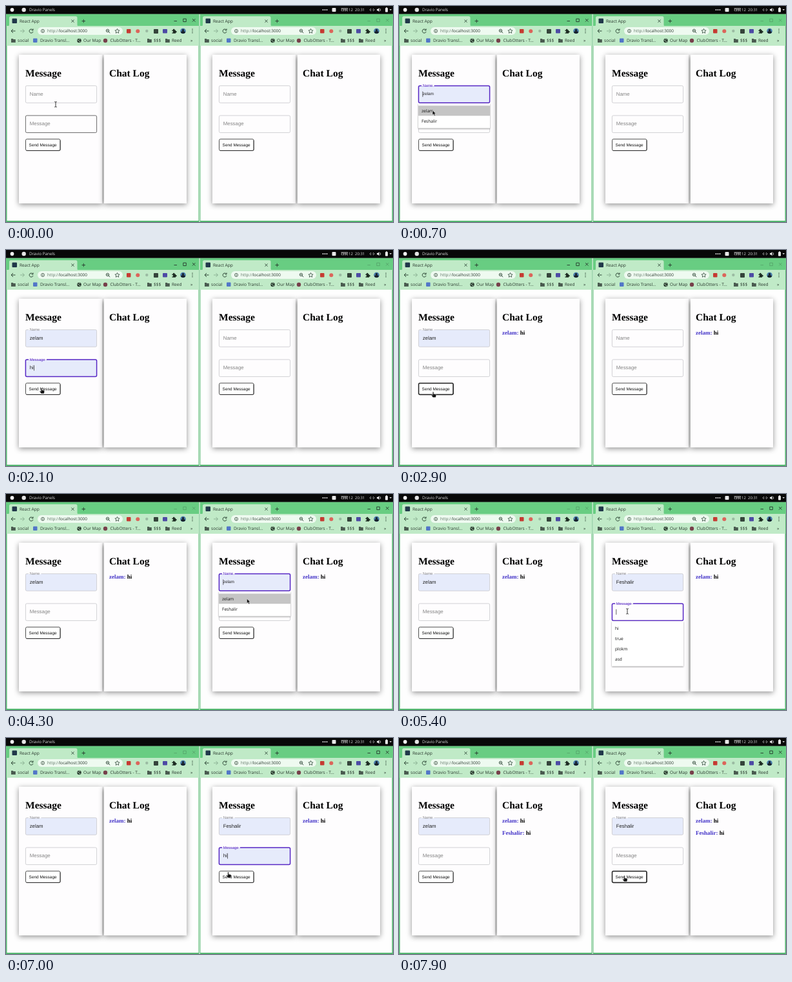
Write an HTML page that moves like this. It is 600 px wide and 337 px high and loops after 8 s.

```html
<!DOCTYPE html>
<html lang="en">
<head>
<meta charset="utf-8">
<title>Two chat windows</title>
<style>
html, body { margin: 0; width: 100%; height: 100%; overflow: hidden; background: #fff; }
svg.stage { display: block; width: 100vw; height: 100vh; }
text { white-space: pre; text-rendering: geometricPrecision; }
.ui { font: 500 6.6px "Open Sans", "Noto Sans", sans-serif; fill: #26352b; }
.sans { font-family: "Liberation Sans", Arial, sans-serif; }
.serif { font-family: "Liberation Serif", Times, serif; font-weight: bold; }
.card { fill: #fefdfe; filter: drop-shadow(0 2px 4.5px rgba(0, 0, 0, .43)); }
.list { fill: #fff; filter: drop-shadow(0 1px .8px rgba(0, 0, 0, .4)); }
.line { fill: none; stroke: #2c4535; stroke-width: 1; }
</style>
</head>
<body>
<svg class="stage" viewBox="0 0 600 337" preserveAspectRatio="none">
  <rect width="600" height="337" fill="#fff"/>
  <g id="windows"></g>
  <g id="menu"></g>
  <g id="live"></g>
</svg>
<script>
const LOOP = 8000, STEP = 100;
const USERS = ["zelam", "Feshalir"];
const WORDS = ["hi", "true", "plokm", "asd"];
const PURPLE = "#5626c4", AUTOFILL = "#e6ebfb";
const $ = id => document.getElementById(id);

const rect = (x, y, w, h, fill, more = "") =>
  `<rect x="${x}" y="${y}" width="${w}" height="${h}" fill="${fill}" ${more}/>`;
const dot = (x, y, r, fill, more = "") =>
  `<circle cx="${x}" cy="${y}" r="${r}" fill="${fill}" ${more}/>`;
const path = (d, more = 'class="line"') => `<path d="${d}" ${more}/>`;
const label = (x, y, str, cls, more = "") =>
  `<text x="${x}" y="${y}" class="${cls}" ${more}>${str}</text>`;
const sans = (x, y, str, size, fill) =>
  label(x, y, str, "sans", `font-size="${size}" fill="${fill}"`);
const shift = (x, y, body) => `<g transform="translate(${x} ${y})">${body}</g>`;

const folder = x => path(`M${x} 51h2.6l1 1h3.2v5h-6.8z`, 'fill="#4a5b50"');

function menuBar() {
  const white = 'fill="#e8e8e8"';
  const thin = 'fill="none" stroke="#ddd" stroke-width=".8"';
  return rect(0, 0, 600, 12.5, "#080808")
    + dot(9.5, 6, 2.9, "#f2f2f2") + dot(27.7, 6, 3.2, "#e4e4e4")
    + label(36, 8.2, "Dravio Panels", "ui", 'style="font-size:6.3px;fill:#ddd"')
    + [492, 495, 498].map(x => dot(x - .5, 6, 1, "#e8e8e8")).join("")
    + rect(505.5, 3, 6, 6, "#e8e8e8", 'rx="1"')
    + path("M519.5 3.8h10.5M521 4q-2 3 0 4.2M523 4v4.5M523 6.5l2-1M526 4v4.5M526 6q2-1 2 1M529 4v4.5", thin)
    + label(531, 8.2, "12  20:31", "ui", 'style="font-size:6px;fill:#ddd"')
    + path("M566 4l-2 2 2 2M569 4l2 2-2 2M567 6h1", thin)
    + path("M575 4.8h1.6l2-1.8v6l-2-1.8h-1.6z", white)
    + path("M580 4q1.6 2 0 4", thin)
    + rect(588, 3, 4, 6.5, "#e8e8e8", 'rx=".7"') + rect(589, 2.2, 2, 1, "#e8e8e8")
    + path("M594.5 5h3.5l-1.75 2z", white);
}

function toolbar() {
  return path("M14.5 39h-6M11 36l-3 3 3 3")
    + path("M22 39h6M25.5 36l3 3-3 3", 'class="line" opacity=".35"')
    + path("M41.6 37.4a3 3 0 1 0 .4 2.6M42 35.5v2.4h-2.4")
    + rect(49, 33, 132, 12, "#eefaf0", 'rx="6"')
    + dot(57, 39, 2.6, "none", 'stroke="#46594c" stroke-width=".8"') + path("M57 38.5v2M57 37v.6")
    + label(64, 41.4, '<tspan fill="#5c7263">http://</tspan>localhost:3000', "ui", 'style="font-size:6.4px"')
    + dot(157.5, 38.5, 2.2, "none", 'stroke="#2c4535" stroke-width=".9"') + path("M159.2 40.2l2 2M156.5 38.5h2")
    + path("M172.5 35.5l1.1 2.3 2.5.3-1.9 1.7.5 2.5-2.2-1.2-2.2 1.2.5-2.5-1.9-1.7 2.5-.3z", 'class="line" style="stroke-width:.8"')
    + rect(187, 36, 6.5, 6.5, "#c63a32", 'rx="1"')
    + dot(204.3, 39.3, 3, "#dc655b")
    + dot(218.3, 39, 2.2, "#9bbba3")
    + rect(229, 36, 7, 7, "#35443b", 'rx="1"')
    + rect(243, 36, 7, 6.5, "#4d4aa5", 'rx="1"')
    + path("M257.5 37.5h1.6a1.2 1.2 0 1 1 2.2 0h1.7v1.7a1.2 1.2 0 1 1 0 2.2v1.4h-5.5v-1.6a1.1 1.1 0 1 0 0-2z", 'fill="#1d2b22"')
    + dot(274.5, 39, 4.3, "#477caa")
    + dot(274.5, 37.7, 1.6, "#17202a") + path("M271 41.5a3.5 2.6 0 0 1 7 0q-3.5 3-7 0", 'fill="#17202a"')
    + [36.3, 39, 41.7].map(y => dot(289, y, .75, "#2c4535")).join("");
}

function bookmarks() {
  const names = [[18, "social"], [53, "Dravio Transl..."], [120, "Our Map"],
    [161.5, "ClubOtters - T..."], [229, "$$$"], [257, "Reed"], [286, "»"]];
  return [8, 219, 247].map(folder).join("")
    + rect(42, 50.5, 6.5, 6.5, "#5276c8", 'rx="1"')
    + dot(113.5, 54, 3.2, "#26352b") + path("M111 53q2 0 2.5 2t2 .5M113 51.5l2 1", 'fill="none" stroke="#c0eac7" stroke-width=".8"')
    + dot(154, 54, 3.2, "#77404b")
    + names.map(([x, s]) => label(x, 56.2, s, "ui")).join("");
}

function browser(x) {
  return shift(x, 0,
    rect(0, 12.5, 300, 324.5, "#55b871")
    + rect(1.5, 62, 297, 273, "#fefefe")
    + rect(0, 12.5, 300, 19, "#68cd82")
    + path("M3 31.5q2 0 2-2v-11q0-2.5 2.5-2.5h100.500q2.500 0 2.500 2.500v11q0 2 2 2z", 'fill="#c0eac7"')
    + rect(1, 31, 298, 31, "#c0eac7")
    + rect(9.5, 19.5, 7.5, 7.5, "#21384a", 'rx="1"')
    + label(21, 26, "React App", "ui")
    + path("M101.500 21.500l4 4m0-4l-4 4M117.500 23.500h5.500m-2.750-2.750v5.500")
    + toolbar() + bookmarks()
    + '<rect class="card" x="20" y="76" width="129" height="232"/>'
    + '<rect class="card" x="152" y="76" width="128" height="232"/>'
    + label(30, 110, "Message", "serif", 'font-size="15.5"')
    + label(160, 110, "Chat Log", "serif", 'font-size="15.5"'));
}

function field(y, title, f) {
  const raised = f.focus || f.value;
  const edge = f.focus ? PURPLE : f.hover ? "#444" : "#c6c6c9";
  const width = f.focus ? 1.5 : .8;
  let out = rect(30.4, y + .4, 110.2, 26.7, f.value ? AUTOFILL : "#fefdfe",
    `rx="2" stroke="${edge}" stroke-width="${width}"`);
  if (raised) {
    out += rect(35, y - 1, title === "Name" ? 19.5 : 28, 2.2, "#fefdfe")
      + sans(36.7, y + 2.1, title, 5.9, f.focus ? PURPLE : "#85858a");
  } else {
    out += sans(36.7, y + 15.8, title, 7.9, "#858585");
  }
  if (f.value) out += sans(36.7, y + (f.preview ? 15.4 : 15.8), f.value, f.preview ? 6.5 : 7.8, "#222");
  if (f.caret) out += rect(f.value && !f.preview ? 43.2 : 36.5, y + 9.3, .7, 8.5, "#222");
  return out;
}

function dropdown(y, items, over) {
  const h = items.length * 15.8 + 7;
  return `<rect class="list" x="30" y="${y}" width="111" height="${h}"/>`
    + items.map((s, i) => {
      const top = y + 3.5 + i * 15.8;
      return (i === over ? rect(30, top, 111, 15.8, "#c5c5c5") : "")
        + label(35, top + 10.4, s, "ui", 'style="fill:#111"');
    }).join("");
}

// Times in ms at which each visitor acts; overs are [time, list row].
const PLANS = [
  { x: 0, user: 0, nameAt: 300, nameOvers: [[600, 0]], nameSet: 900,
    msgAt: 1200, msgOvers: [[1700, 0]], msgSet: 1900, sent: 2500, leave: 3900 },
  { x: 300, user: 1, nameAt: 3900, nameOvers: [[4200, 0], [4500, 1]], nameSet: 4700,
    msgAt: 5000, msgOvers: [[5900, 0]], msgSet: 6500, sent: 7500, leave: LOOP }
];
const within = (t, a, b) => t >= a && t < b;
const rowAt = (t, overs) => overs.reduce((row, [at, i]) => t >= at ? i : row, -1);
const blink = (t, from) => (t - from) % 1000 < 500;

function form(p, t) {
  const nameOpen = within(t, p.nameAt, p.nameSet), msgOpen = within(t, p.msgAt, p.msgSet);
  const nameRow = rowAt(t, p.nameOvers), msgRow = rowAt(t, p.msgOvers);
  const name = {
    focus: within(t, p.nameAt, p.msgAt), preview: nameOpen,
    value: t >= p.nameSet ? USERS[p.user] : nameOpen ? USERS[nameRow] : "",
    caret: nameOpen && blink(t, p.nameAt)
  };
  const msg = {
    focus: within(t, p.msgAt, p.sent), preview: msgOpen, hover: p.x === 0 && t < 200,
    value: within(t, p.msgSet, p.sent) ? WORDS[0] : msgOpen ? WORDS[msgRow] : "",
    caret: within(t, p.msgAt, p.sent) && blink(t, msgOpen ? p.msgAt : p.msgSet + 100)
  };
  const pressed = within(t, p.sent, p.leave);
  let out = field(124, "Name", name) + field(170.5, "Message", msg)
    + rect(30.5, 207.7, 53.5, 17.8, "#fff", `rx="2" stroke="#222" stroke-width="${pressed ? 1.5 : .8}"`)
    + path("M31.500 225.700h51q1.700 0 1.700-1.700v-14.500", 'fill="none" stroke="#222" stroke-width=".7"')
    + sans(35.6, 218.9, "Send Message", 6.45, "#111");
  if (nameOpen) out += dropdown(152, USERS, nameRow);
  if (msgOpen) out += dropdown(198.5, WORDS, msgRow);

  PLANS.filter(q => t >= q.sent).forEach((q, i) => {
    out += label(160, 132 + i * 19.3,
      `<tspan fill="#4434c8">${USERS[q.user]}:</tspan> ${WORDS[0]}`, "serif", 'font-size="9"');
  });
  const active = (t >= 3900) === (p.x > 0);
  out += path("M260.500 23.500h4.500M274.800 20h4.500v4.500h-4.500zM289 20l4.500 4.500m0-4.500l-4.500 4.500",
    `class="line" opacity="${active ? 1 : .25}"`);
  return shift(p.x, 0, out);
}

const POINTERS = {
  beam: path("M-1.800-4.200q1.800 0 1.800 1v6.400q0 1-1.800 1M1.800-4.200q-1.800 0-1.800 1M1.800 4.200q-1.800 0-1.800-1",
    'fill="none" stroke="#222" stroke-width=".9"'),
  arrow: path("M0 0v7l1.700-1.500 1.300 2.700 1.300-.6-1.300-2.600h2.200z", 'fill="#111" stroke="#fff" stroke-width=".4"'),
  hand: path("M-.800.800q.800-1.500 1.600 0v2.700l2.700.5q1.300.4 1.200 1.700l-.700 3.300h-4.500l-2.300-3.200q-.2-1.300 1.200-.7l.8.700z",
    'fill="#111" stroke="#fff" stroke-width=".4"')
};
// [time, x, y, pointer shape until the next point]
const TRACK = [
  [0, 77, 153.5, "beam"], [300, 68, 140, "beam"], [500, 62, 151, "arrow"], [700, 52, 163, "arrow"],
  [900, 50, 163, "beam"], [1200, 67, 185, "beam"], [1350, 66, 194, "arrow"], [1500, 65.5, 201, "arrow"],
  [1700, 58, 209, "arrow"], [1900, 57, 210, "hand"], [2300, 53, 220, "hand"], [2900, 53, 221, "hand"],
  [3100, 85, 218, "arrow"], [3800, 365, 140, "beam"], [4100, 372, 153, "arrow"], [4300, 373.5, 163.5, "arrow"],
  [4500, 370, 177, "arrow"], [4700, 368, 178, "beam"], [5000, 355, 184, "beam"], [5400, 354, 183, "beam"],
  [5700, 350, 198, "arrow"], [5900, 346, 208, "arrow"], [6500, 345, 209, "hand"], [7000, 344.5, 209, "hand"],
  [7500, 349.5, 215, "hand"], [LOOP, 349.5, 215, "hand"]
];

function pointer(t) {
  const i = TRACK.findIndex(k => k[0] > t);
  const [t0, x0, y0, shape] = TRACK[i - 1], [t1, x1, y1] = TRACK[i];
  const k = (t - t0) / (t1 - t0);
  return shift(x0 + (x1 - x0) * k, y0 + (y1 - y0) * k, POINTERS[shape]);
}

$("windows").innerHTML = browser(0) + browser(300) + rect(299.5, 12.5, 1.2, 324.5, "#e0efe3");
$("menu").innerHTML = menuBar();

const start = performance.now();
let shown = -1;
function draw() {
  const t = Math.floor((performance.now() - start) % LOOP / STEP) * STEP;
  if (t !== shown) {
    shown = t;
    $("live").innerHTML = PLANS.map(p => form(p, t)).join("") + pointer(t);
  }
  requestAnimationFrame(draw);
}
draw();
</script>
</body>
</html>
```
